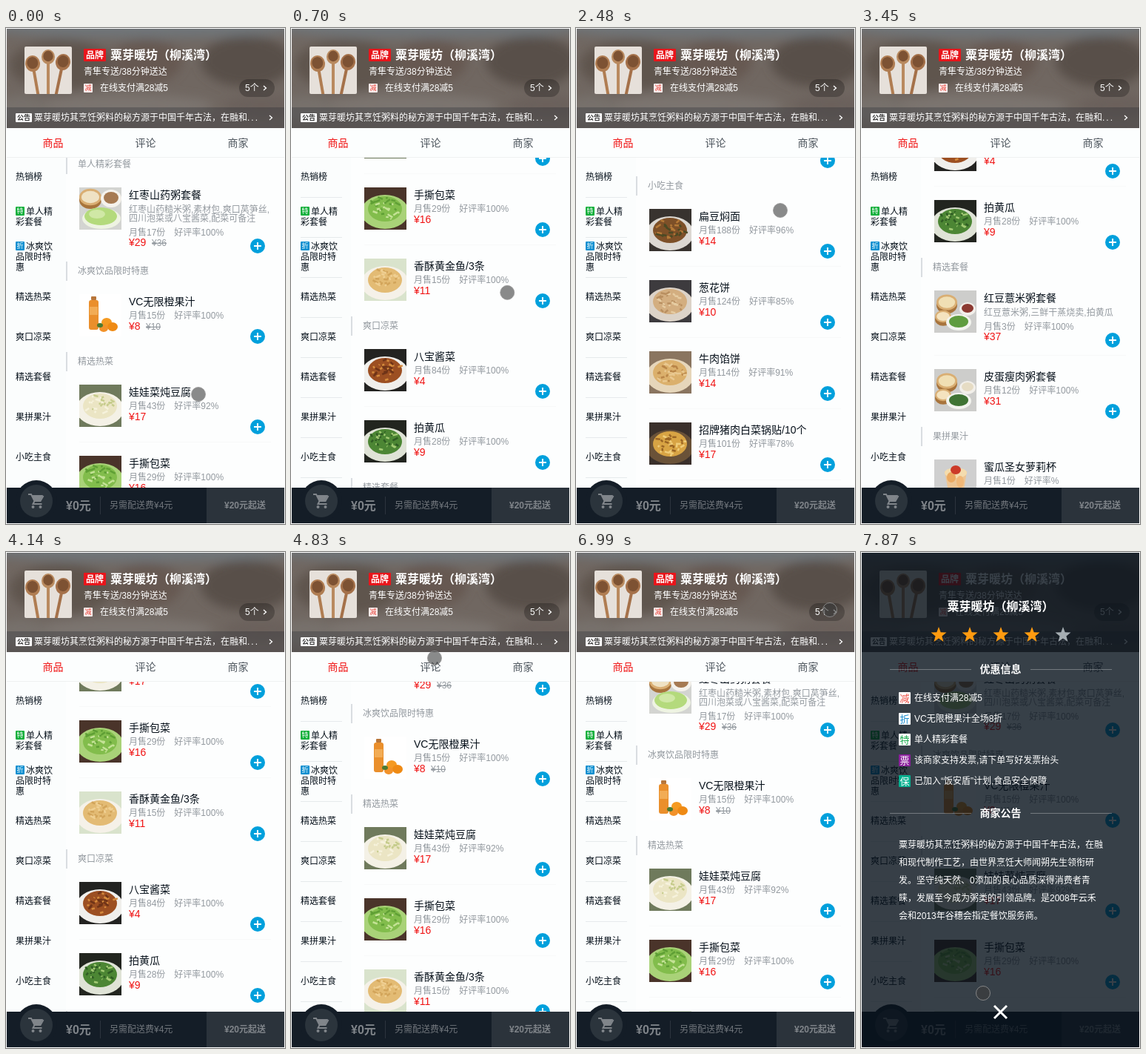
These frames come from a looping animation (377x669 px, 8000 ms). An HTML page:

```html
<!DOCTYPE html>
<html lang="zh-CN">
<head>
<meta charset="utf-8">
<title>粟芽暖坊</title>
<style>
html, body { margin: 0; height: 100%; overflow: hidden; background: #fff; }
svg { display: block; font-family: "Liberation Sans", "Noto Sans CJK SC", "Noto Sans CJK", sans-serif; }
</style>
</head>
<body>
<svg id="stage" width="377" height="669" viewBox="0 0 377 669"></svg>
<script>
const RED = '#f01414', INK = '#07111b', GREY = '#93999f', BLUE = '#00a0dc', BAR = '#141d27';
const shop = '粟芽暖坊', branch = shop + '（柳溪湾）';

// y is the vertical middle of the glyphs
const text = (x, y, s, size = 12, fill = INK, extra = '') =>
  `<text x="${x}" y="${Math.round(y + size * .36)}" font-size="${size}" fill="${fill}" ${extra}>${s}</text>`;
const rect = (x, y, w, h, fill, r = 0) =>
  `<rect x="${x}" y="${y}" width="${w}" height="${h}" rx="${r}" fill="${fill}"/>`;
const oval = (x, y, rx, ry, fill) => `<ellipse cx="${x}" cy="${y}" rx="${rx}" ry="${ry}" fill="${fill}"/>`;
const line = (d, stroke, width = 1) => `<path d="${d}" fill="none" stroke="${stroke}" stroke-width="${width}"/>`;
const MID = 'text-anchor="middle"', BOLD = 'font-weight="700"';
const badge = (x, y, size, s, bg, fg = '#fff') =>
  rect(x, y, size, size, bg, 1) + text(x + size / 2, y + size / 2, s, size - 3, fg, MID);
const chevron = (x, y) => line(`M${x - 2} ${y - 3}l3.5 3l-3.5 3`, '#fff', 1.3);

// Food pictures, 57 x 57
let seed = 7;
const rnd = () => (seed = seed * 16807 % 2147483647) / 2147483647;
const dish = (bg, plate, food, accent, shade) => {
  let s = rect(0, 0, 57, 57, bg) + oval(28, 33, 32, 23, plate) + oval(28, 29, 23, 17, food);
  for (let i = 0; i < 30; i++) {
    const a = rnd() * 6.28, r = Math.sqrt(rnd());
    const x = 28 + 20 * r * Math.cos(a), y = 29 + 14 * r * Math.sin(a);
    s += line(`M${x.toFixed(1)} ${y.toFixed(1)}l${(rnd() * 14 - 7).toFixed(1)} ${(rnd() * 8 - 4).toFixed(1)}`,
      i % 2 ? accent : shade, 2.5);
  }
  return s;
};
const steamer = (x, y, r, fill) => oval(x, y + 4, r, r * .8, '#a8743c') + oval(x, y, r, r * .75, '#d9ae73') +
  oval(x, y, r * .8, r * .55, fill);
const meal = (bowl, green) => rect(0, 0, 57, 57, '#cdcdcb') + steamer(17, 16, 14, '#f0dfb4') +
  oval(45, 25, 11, 9, '#f2efea') + oval(45, 24, 8, 6, bowl) + steamer(12, 35, 11, '#f4e3bf') +
  oval(33, 43, 17, 11, '#f3f4ef') + oval(33, 42, 13, 8, green);
const salad = rect(0, 0, 57, 57, '#d3d4d1') + steamer(15, 13, 15, '#efe2c4') + oval(43, 15, 14, 12, '#f5f2ec') +
  oval(43, 14, 10, 8, '#a67a52') + oval(30, 42, 26, 14, '#eef3e2') + oval(29, 39, 22, 12, '#b4da7c') +
  oval(24, 36, 11, 6, '#d0e8a6');
const juice = rect(0, 0, 57, 57, '#fff') + rect(16, 3, 7, 5, '#b8763a', 1) + rect(13, 8, 13, 40, '#ea8f2c', 3) +
  rect(14, 17, 11, 11, '#f2ac55') + oval(37, 38, 7, 6, '#f59a22') + oval(33, 46, 6, 5, '#f2922a') +
  oval(45, 44, 7, 6, '#ef8a14') + oval(28, 42, 4, 3, '#4c7a30');
const cup = rect(0, 0, 57, 57, '#cfcfcf') +
  '<path d="M14 16H44L38 53Q29 57 21 53Z" fill="#edc594"/>' + oval(29, 18, 15, 7, '#f4dcae') +
  oval(23, 24, 6, 7, '#eba961') + oval(35, 30, 5, 8, '#f1b878') + oval(29, 14, 7, 6, '#cc3a28');
const can = rect(0, 0, 57, 57, '#fff') + rect(18, 6, 21, 45, '#b5402f', 3);

// name, sold, rating, price, picture, old price, description lines
const groups = [
  ['单人精彩套餐', ['红枣山药粥套餐', 17, 100, 29, salad, 36, ['红枣山药糙米粥,素材包,爽口莴笋丝,', '四川泡菜或八宝酱菜,配菜可备注']]],
  ['冰爽饮品限时特惠', ['VC无限橙果汁', 15, 100, 8, juice, 10]],
  ['精选热菜',
    ['娃娃菜炖豆腐', 43, 92, 17, dish('#6f7a5c', '#f4f1e6', '#ebe5c4', '#f6f2dc', '#c6cc8c')],
    ['手撕包菜', 29, 100, 16, dish('#4a342a', '#a9d278', '#82bd4c', '#c4e296', '#5f9f35')],
    ['香酥黄金鱼/3条', 15, 100, 11, dish('#d9e3cc', '#f5f1e8', '#e3bb74', '#efcf92', '#d2a45a')]],
  ['爽口凉菜',
    ['八宝酱菜', 84, 100, 4, dish('#232321', '#f0efec', '#9c4f22', '#d48a3c', '#6f3418')],
    ['拍黄瓜', 28, 100, 9, dish('#22251f', '#dfe3d6', '#4c8634', '#a3cb74', '#2f5c24')]],
  ['精选套餐',
    ['红豆薏米粥套餐', 3, 100, 37, meal('#8c3a32', '#5f9c3f'), 0, ['红豆薏米粥,三鲜干蒸烧卖,拍黄瓜']],
    ['皮蛋瘦肉粥套餐', 12, 100, 31, meal('#e6dcc4', '#3f7434')]],
  ['果拼果汁',
    ['蜜瓜圣女萝莉杯', 1, '', 6, cup],
    ['罗汉果凉茶', 6, 100, 6, can],
    ['VC无限橙果汁', 15, 100, 8, juice]],
  ['小吃主食',
    ['扁豆焖面', 188, 96, 14, dish('#38332f', '#dcd8d2', '#7d5028', '#b57a38', '#4c4a24')],
    ['葱花饼', 124, 85, 10, dish('#3d3b3e', '#dcd3c8', '#d3ae80', '#e6cca2', '#b98f60')],
    ['牛肉馅饼', 114, 91, 14, dish('#8a7560', '#e6d6ba', '#dbb06c', '#e9c890', '#b98548')],
    ['招牌猪肉白菜锅贴/10个', 101, 78, 17, dish('#3a302b', '#6a5238', '#d8a444', '#f0cd7a', '#9a6524')],
    ['糊塌子', 80, 93, 10, dish('#45403a', '#eee9df', '#cfae5c', '#8fa24c', '#b8923f')]]
];

function item(y, [name, sold, rating, price, pic, old, desc = []]) {
  const extra = desc.length ? 12 * desc.length - 2 : 0;
  const plusY = y + 57 + extra, priceY = plusY - (extra ? 5 : 14);
  return `<g transform="translate(99 ${y})">${pic}</g>` +
    text(166, y + 10, name, 14) +
    desc.map((s, i) => text(166, y + 30 + 12 * i, s, 12, GREY)).join('') +
    text(166, priceY - (extra ? 13 : 14), `月售${sold}份<tspan dx="12">好评率${rating}%</tspan>`, 12, GREY) +
    text(166, priceY, '¥' + price, 14, RED) +
    (old ? text(price > 9 ? 197 : 189, priceY + 1, '¥' + old, 12, GREY, 'text-decoration="line-through"') : '') +
    oval(340, plusY, 10, 10, BLUE) + line(`M335 ${plusY}h10M340 ${plusY - 5}v10`, '#fff', 2);
}

function goods() {
  let s = '', y = 0;
  for (const [title, ...foods] of groups) {
    s += rect(81, y, 2, 26, '#d9dde1') + text(97, y + 13, title, 12, GREY);
    y += 44;
    foods.forEach((f, i) => {
      s += item(y, f);
      y += 78 + (f[6] ? 12 * f[6].length - 2 : 0);
      if (i < foods.length - 1) {
        s += rect(99, y - 1, 259, 1, '#f8f9f9');
        y += 18;
      }
    });
  }
  return s;
}

function menu() {
  const rows = ['精选热菜', '爽口凉菜', '精选套餐', '果拼果汁', '小吃主食'];
  let rules = '';
  for (let i = 0; i < 8; i++) rules += rect(13, 228 + 54 * i, 56, 1, '#e6eaec');
  return rect(1, 175, 375, 445, '#fdfefe') + rect(1, 175, 80, 445, '#fbfdfd') + `<g id="rules">${rules}</g>` +
    text(13, 201, '热销榜') +
    badge(13, 241, 12, '特', '#12b03c') + text(27, 248, '单人精') + text(13, 262, '彩套餐') +
    badge(13, 288, 12, '折', '#0b8fd0') + text(27, 295, '冰爽饮') + text(13, 309, '品限时特') + text(13, 323, '惠') +
    rows.map((s, i) => text(13, 363 + 54 * i, s)).join('');
}

const spoon = (x, y, r, tilt, fill) => `<g transform="translate(${x} ${y}) rotate(${tilt})">` +
  rect(-2, 0, 4, 55, fill) + oval(0, 0, r, r * 1.1, fill) + oval(0, -1, r * .75, r * .8, '#7d5233') + '</g>';

function header() {
  return '<g clip-path="url(#head)">' + rect(1, 1, 375, 134, '#706761') +
    '<g filter="url(#soft)">' + oval(190, 0, 220, 14, '#6f7478') + oval(75, 50, 70, 34, '#5e544d') +
    oval(190, 45, 48, 30, '#665951') + oval(325, 45, 62, 34, '#594f49') + oval(160, 105, 120, 16, '#7c756f') +
    oval(345, 105, 50, 14, '#6a615b') + oval(20, 110, 40, 18, '#77716c') + '</g>' +
    rect(1, 107, 375, 28, 'rgba(7,17,27,.22)') + '</g>' +
    '<g clip-path="url(#face)">' + rect(25, 25, 64, 64, '#e6e0da') +
    spoon(36, 48, 10, -10, '#b07d52') + spoon(57, 39, 9, 0, '#b98a5f') + spoon(77, 46, 10, 12, '#a5714a') + '</g>' +
    rect(105, 28, 30, 17, '#e8151b', 1) + text(120, 36.5, '品牌', 12, '#fff', MID + BOLD) +
    text(141, 36, branch, 16, '#fff', BOLD) +
    text(105, 59, '青隼专送/38分钟送达', 12, '#fff') +
    badge(105, 75, 12, '减', '#fbeceb', '#e8453c') + text(127, 81, '在线支付满28减5', 12, '#fff') +
    rect(315, 69, 48, 24, 'rgba(0,0,0,.25)', 12) + text(323, 81, '5个', 12, '#fff') + chevron(350, 81) +
    rect(13, 115, 22, 12, '#fff', 1) + text(24, 121, '公告', 9, '#333', MID + BOLD) +
    text(38, 121, shop + '其烹饪粥料的秘方源于中国千年古法，在融和<tspan letter-spacing="2">...</tspan>', 12, '#fff') +
    chevron(358, 121);
}

const tabs = () => rect(1, 135, 375, 40, '#fcfefe') + rect(1, 174, 375, 1, '#eff1f1') +
  ['商品', '评论', '商家'].map((s, i) => text(63.5 + 125 * i, 155, s, 14, i ? '#4d555d' : RED, MID)).join('');

const cart = () => rect(1, 620, 375, 48, BAR) + oval(41, 638, 28, 28, BAR) + oval(41, 638, 22, 22, '#2b343c') +
  line('M30 629h4l4.5 9h8l4-7', '#80858a', 2) + '<path d="M35 630h15l-4 8h-7.5z" fill="#80858a"/>' +
  line('M38.5 638l-2 4h12', '#80858a', 2) + oval(36.5, 646, 2, 2, '#80858a') + oval(46.5, 646, 2, 2, '#80858a') +
  text(81, 644, '¥0元', 16, '#80858a', BOLD) + rect(127, 632, 1, 24, '#2c343d') +
  text(140, 644, '另需配送费¥4元', 12, '#72777d') +
  rect(271, 620, 105, 48, '#2b333b') + text(323, 644, '¥20元起送', 12, '#80858a', MID + BOLD);

function star(x, y, fill) {
  let pts = '';
  for (let i = 0; i < 10; i++) {
    const r = i % 2 ? 4.6 : 11, a = i * Math.PI / 5;
    pts += `${(x + r * Math.sin(a)).toFixed(1)},${(y - r * Math.cos(a)).toFixed(1)} `;
  }
  return `<polygon points="${pts}" fill="${fill}"/>`;
}

function detail() {
  const section = (y, s) => text(188.5, y, s, 14, '#fff', MID + BOLD) +
    rect(39, y, 110, 1, 'rgba(255,255,255,.3)') + rect(229, y, 110, 1, 'rgba(255,255,255,.3)');
  const offers = [
    ['减', '#fff', '#ee4f45', '在线支付满28减5'],
    ['折', '#fff', '#1789cc', 'VC无限橙果汁全场8折'],
    ['特', '#fff', '#16a94a', '单人精彩套餐'],
    ['票', '#8a1f9b', '#fff', '该商家支持发票,请下单写好发票抬头'],
    ['保', '#04b08f', '#fff', '已加入“饭安盾”计划,食品安全保障']
  ];
  const notice = [
    shop + '其烹饪粥料的秘方源于中国千年古法，在融',
    '和现代制作工艺，由世界烹饪大师闻朔先生领衔研',
    '发。坚守纯天然、0添加的良心品质深得消费者青',
    '睐，发展至今成为粥类的引领品牌。是2008年云禾',
    '会和2013年谷穗会指定餐饮服务商。'
  ];
  return rect(1, 1, 375, 667, 'rgba(7,17,27,.8)') +
    text(188.5, 73, branch, 16, '#fff', MID + BOLD) +
    [0, 1, 2, 3, 4].map(i => star(105 + 42 * i, 112, i < 4 ? '#ff9b10' : '#a5adb2')).join('') +
    section(158, '优惠信息') + section(352, '商家公告') +
    offers.map(([s, bg, fg, label], i) => badge(51, 189 + 28 * i, 16, s, bg, fg) +
      text(72, 197 + 28 * i, label, 12, '#fff')).join('') +
    notice.map((s, i) => text(51, 395 + 24 * i, s, 12, '#fff')).join('') +
    line('M180 612l17 17M197 612l-17 17', '#fff', 3);
}

const stage = document.getElementById('stage');
stage.innerHTML = `<defs>
  <clipPath id="head"><rect x="1" y="1" width="375" height="134"/></clipPath>
  <clipPath id="face"><rect x="25" y="25" width="64" height="64" rx="2"/></clipPath>
  <clipPath id="view"><rect x="81" y="175" width="295" height="445"/></clipPath>
  <clipPath id="pic"><rect width="57" height="57"/></clipPath>
  <filter id="soft" x="-20%" y="-50%" width="140%" height="200%"><feGaussianBlur stdDeviation="7"/></filter>
  </defs>` + menu() +
  `<g clip-path="url(#view)"><g id="list">${goods()}</g></g>` + header() + tabs() + cart() +
  `<g id="detail">${detail()}</g>` +
  '<circle id="touch" r="9.5" fill="rgba(60,60,60,.6)" stroke="rgba(150,150,150,.8)"/>';
const [rules, list, sheet, touch] = ['rules', 'list', 'detail', 'touch'].map(id => document.getElementById(id));
for (const pic of list.querySelectorAll('g')) pic.setAttribute('clip-path', 'url(#pic)');

// The picture advances in steps: first, last, count
const steps = [[0, 0, 1], [120, 1130, 8], [1250, 1370, 2], [1500, 2210, 6], [2360, 2480, 2], [2730, 3330, 5],
  [3450, 4380, 8], [4530, 4830, 3], [4960, 5560, 5], [5710, 5990, 3], [6140, 6710, 5], [6860, 6990, 2], [7300, 7870, 5]]
  .flatMap(([a, b, n]) => Array.from({ length: n }, (_, i) => a + (b - a) * i / Math.max(1, n - 1)));

const scroll = [[0, 171], [1370, -540], [2360, -1120], [2480, -1140], [2730, -1105], [3450, -488],
  [4530, 15], [4830, 61], [5990, 117], [8000, 117]];
const path = [[0, 260, 494], [600, 285, 250], [800, 300, 470], [1370, 317, 287], [1600, 325, 215], [1850, 310, 460],
  [2360, 278, 255], [2480, 276, 246], [2730, 290, 330], [3200, 360, 655], [3330, 400, 720], [4380, 400, 400],
  [4530, 330, 280], [4830, 194, 143], [5990, 184, 153], [6710, 309, 91], [6990, 343, 78], [7300, 343, 78],
  [7870, 165, 595], [8000, 165, 595]];

function at(keys, t) {
  const i = Math.max(1, keys.findIndex(k => k[0] >= t));
  const a = keys[i - 1], b = keys[i], p = (t - a[0]) / (b[0] - a[0]);
  return a.slice(1).map((v, j) => v + (b[j + 1] - v) * p);
}

function draw(now) {
  const clock = now % 8000;
  const t = steps.filter(s => s <= clock + 1).pop();
  list.setAttribute('transform', `translate(0 ${Math.round(at(scroll, t)[0])})`);
  const [x, y] = at(path, t);
  touch.setAttribute('cx', x);
  touch.setAttribute('cy', y);
  touch.style.display = t > 3300 && t < 4500 ? 'none' : '';
  rules.style.display = t < 120 || t > 3000 && t < 4500 ? 'none' : '';
  sheet.style.opacity = t < 7300 ? 0 : Math.min(1, (t - 7200) / 500);
  requestAnimationFrame(draw);
}
draw(0);
</script>
</body>
</html>
```
